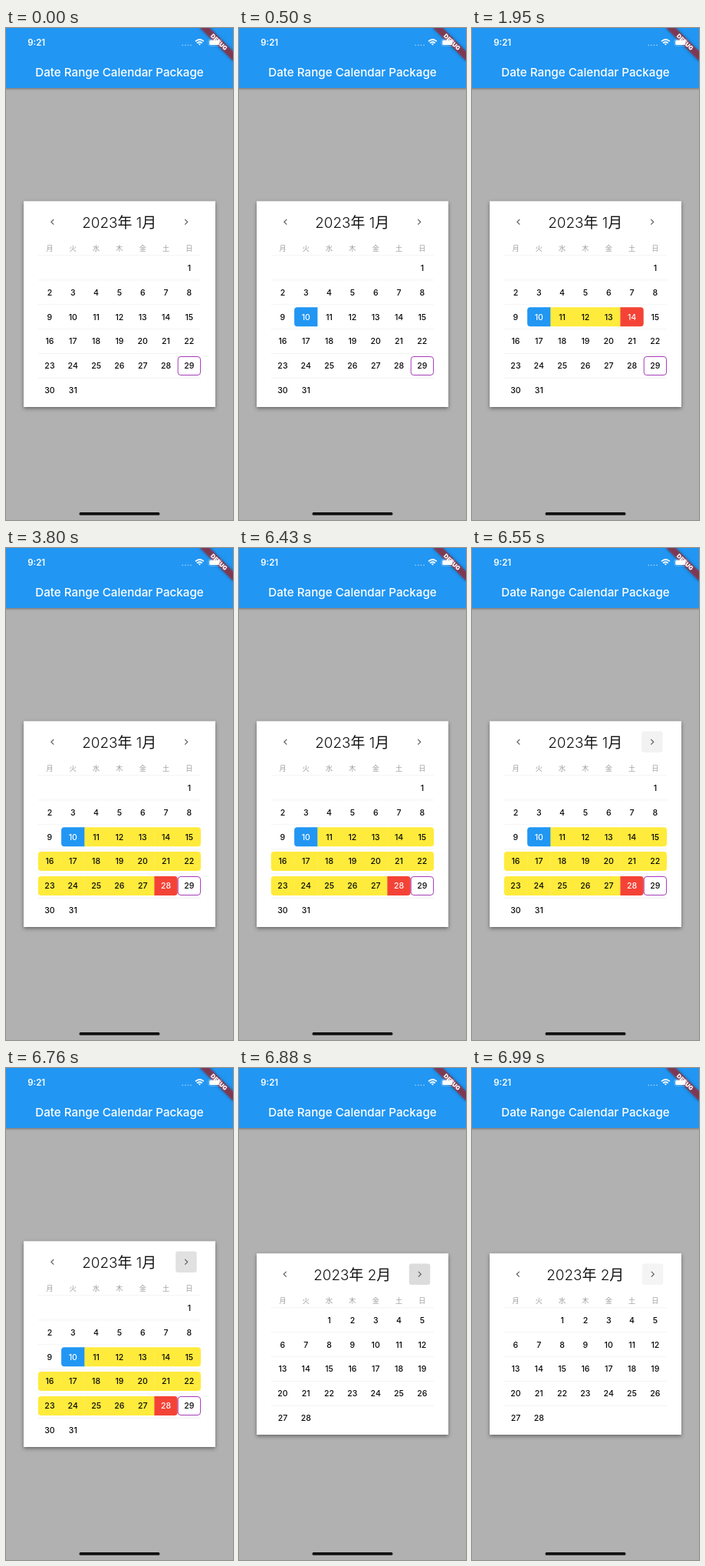
These frames come from a looping animation (296 px wide and 640 px high, 8000 ms). An HTML page:

```html
<!DOCTYPE html>
<html lang="ja">
<head>
<meta charset="utf-8">
<title>Date Range Calendar</title>
<style>
html, body { margin: 0; width: 100%; height: 100%; overflow: hidden; background: #b1b1b1; }
svg { display: block; width: 100%; height: 100%; }
text { font-family: Inter, "Noto Sans CJK JP", "Noto Sans CJK", sans-serif; text-anchor: middle; }
.appbar { fill: #2196f3; filter: drop-shadow(0 1.5px 1.8px rgba(0, 0, 0, .38)); }
.title { fill: #fff; font-size: 15.2px; font-weight: 500; }
.clock { fill: #fff; font-size: 11.4px; font-weight: 600; }
.ribbon { fill: rgba(183, 28, 28, .627); filter: drop-shadow(0 0 2.3px rgba(0, 0, 0, .5)); }
.debug { fill: #fff; font-size: 7.7px; font-weight: 900; }
.panel { fill: #fff; filter: drop-shadow(0 2.5px 2.5px rgba(0, 0, 0, .42)); }
.month { fill: #111; font-size: 18.9px; font-weight: 300; }
.weekday { fill: #9e9e9e; font-size: 9.1px; }
.day { fill: #0a0a0a; font-size: 10.6px; font-weight: 500; }
.day.edge { fill: #fff; }
.rule { stroke: #f0f0f0; stroke-width: .8; }
.chevron { fill: none; stroke: #5c5c5c; stroke-width: 1.2; }
.today { fill: none; stroke: #9c27b0; stroke-width: .9; }
</style>
</head>
<body>
<svg viewBox="0 0 296 640">
  <rect width="296" height="640" fill="#b1b1b1"/>
  <rect class="appbar" x="-6" y="-6" width="308" height="84"/>
  <text class="title" x="148" y="62.5">Date Range Calendar Package</text>
  <g id="card"></g>
  <g transform="translate(296 0) rotate(45)">
    <rect class="ribbon" x="-30.4" y="21.3" width="60.8" height="9.1"/>
    <text class="debug" x="0" y="28.6">DEBUG</text>
  </g>
  <text class="clock" x="39.7" y="23">9:21</text>
  <g fill="#fff" fill-opacity=".5">
    <circle cx="230.3" cy="22.3" r=".9"/><circle cx="233.9" cy="22.3" r=".9"/>
    <circle cx="237.5" cy="22.3" r=".9"/><circle cx="241.1" cy="22.3" r=".9"/>
  </g>
  <g fill="none" stroke="#fff" stroke-width="1.7">
    <path d="M247 17.4Q252.4 12.6 257.8 17.4"/>
    <path d="M249 19.7Q252.4 16.8 255.8 19.7"/>
    <path d="M250.7 20.8Q252.4 19.6 254.1 20.8L252.4 22.6Z" fill="#fff" stroke="none"/>
  </g>
  <rect x="264" y="14.6" width="17" height="8.6" rx="2.6" fill="none" stroke="#fff" stroke-opacity=".4" stroke-width=".8"/>
  <rect x="265.2" y="15.8" width="13" height="6.2" rx="1.6" fill="#fff"/>
  <rect x="95.5" y="630" width="105" height="3.8" rx="1.9" fill="#111"/>
</svg>
<script>
const LOOP = 8000;
const LEFT = 41.8, CELL = 30.32, ROW = 31.9, BAR = 25;
const JANUARY = { label: "2023年 1月", offset: 6, days: 31, today: 29, top: 225.3, rows: 6 };
const FEBRUARY = { label: "2023年 2月", offset: 2, days: 28, top: 241.2, rows: 5 };

const steps = [
  { at: 0, month: JANUARY },
  { at: 500, month: JANUARY, range: [10, 10] },
  { at: 1950, month: JANUARY, range: [10, 14] },
  { at: 3800, month: JANUARY, range: [10, 28] },
  { at: 6550, month: JANUARY, range: [10, 28], press: "#f2f2f2" },
  { at: 6650, month: JANUARY, range: [10, 28], press: "#e9e9e9" },
  { at: 6760, month: JANUARY, range: [10, 28], press: "#e1e1e1" },
  { at: 6880, month: FEBRUARY, press: "#dcdcdc" },
  { at: 6990, month: FEBRUARY, press: "#f4f4f4" }
];

const label = (kind, x, y, text) => `<text class="${kind}" x="${x}" y="${y}">${text}</text>`;

// Bar with independently rounded left and right ends.
function bar(x, y, width, color, left, right) {
  const l = left ? 4 : 0, r = right ? 4 : 0;
  return `<path fill="${color}" d="M${x + l} ${y}h${width - l - r}q${r} 0 ${r} ${r}v${BAR - 2 * r}q0 ${r} ${-r} ${r}` +
    `h${l + r - width}q${-l} 0 ${-l} ${-l}v${2 * l - BAR}q0 ${-l} ${l} ${-l}z"/>`;
}

const chevron = (x, y, dir) =>
  `<path class="chevron" d="M${x - 1.7 * dir} ${y - 3.4}l${3.4 * dir} 3.4l${-3.4 * dir} 3.4"/>`;

function drawCard({ month, range = [0, -1], press }) {
  const { top, offset, days, rows, today } = month;
  const [start, end] = range;
  const headY = top + 27, firstRow = top + 86.6;
  const arrowX = month === JANUARY ? 235 : 235.6;
  const parts = [`<rect class="panel" x="23" y="${top}" width="250" height="${76.3 + rows * ROW}"/>`];

  if (press) parts.push(`<rect x="${arrowX - 13.8}" y="${headY - 13.8}" width="27.5" height="27.5" rx="3" fill="${press}"/>`);
  parts.push(chevron(295.6 - arrowX, headY, -1), chevron(arrowX, headY, 1),
    label("month", 147.7, top + 35, month.label));

  [..."月火水木金土日"].forEach((name, i) =>
    parts.push(label("weekday", LEFT + CELL * (i + .5), top + 64.4, name)));

  for (let row = 0; row < rows; row++) {
    const y = firstRow - 16 + row * ROW;
    parts.push(`<path class="rule" d="M${LEFT} ${y}h${CELL * 7}"/>`);
  }

  const numbers = [];
  for (let day = 1; day <= days; day++) {
    const slot = day + offset - 1, col = slot % 7;
    const x = LEFT + col * CELL, y = firstRow + Math.floor(slot / 7) * ROW;
    const inRange = day >= start && day <= end;
    const edge = inRange && (day === start || day === end);
    if (inRange) {
      const color = day === start ? "#2196f3" : day === end ? "#f44336" : "#ffeb3b";
      const overlap = col < 6 && day < end ? .3 : 0;
      parts.push(bar(x, y - BAR / 2, CELL + overlap, color, day === start || col === 0, (day === end && day !== start) || col === 6));
    }
    if (day === today) {
      parts.push(`<rect class="today" x="${x + .5}" y="${y - 12}" width="${CELL - 1}" height="24" rx="3.6"/>`);
    }
    numbers.push(label(edge ? "day edge" : "day", x + CELL / 2, y + 3.8, day));
  }
  return parts.concat(numbers).join("");
}

const card = document.getElementById("card");
const begin = performance.now();
let shown = null;

function tick() {
  const time = Math.max(0, performance.now() - begin) % LOOP;
  const step = steps.filter(s => s.at <= time).pop();
  if (step !== shown) {
    card.innerHTML = drawCard(step);
    shown = step;
  }
  requestAnimationFrame(tick);
}
tick();
</script>
</body>
</html>
```
